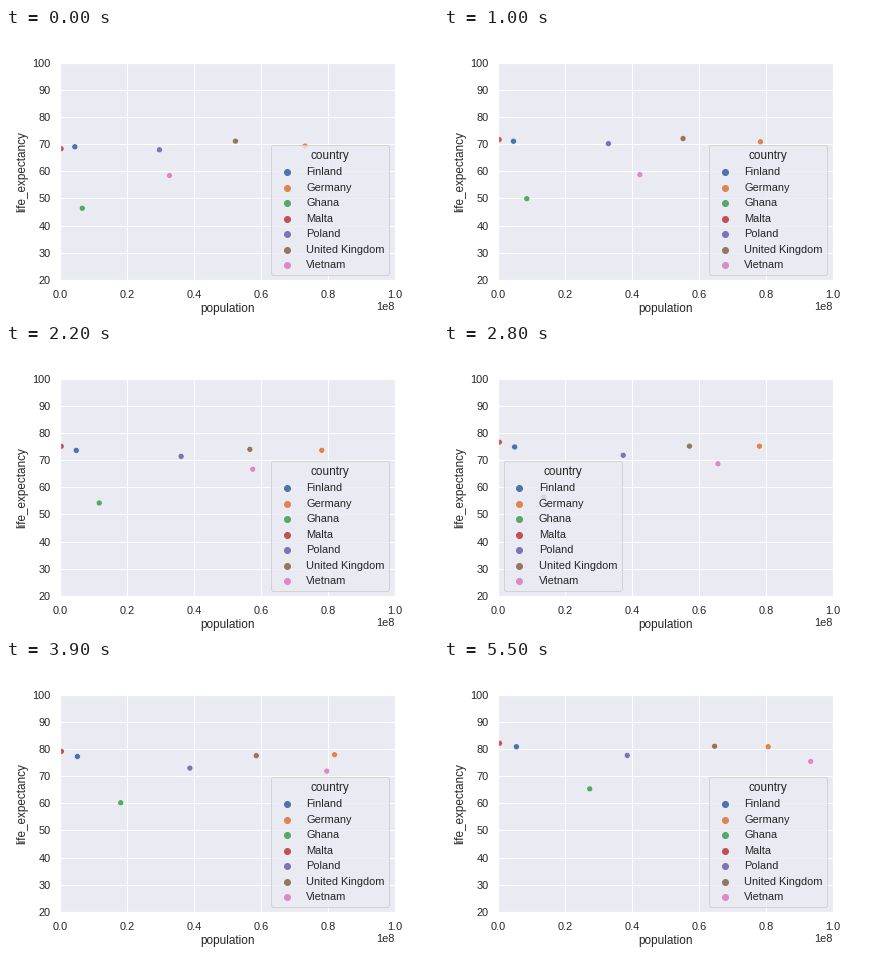
A matplotlib script that plays this animation: 432 px wide and 288 px high, repeating every 5.6 s.

```python
import numpy as np
import matplotlib.pyplot as plt
from matplotlib.animation import FuncAnimation

INK = "#262626"
LABEL, SMALL = 11.7, 11
plt.rcParams.update({
    "font.family": "Liberation Sans", "text.color": INK,
    "figure.facecolor": "white", "savefig.facecolor": "white",
    "figure.subplot.left": 0.125, "figure.subplot.right": 0.9,
    "figure.subplot.bottom": 0.125, "figure.subplot.top": 0.88,
    "axes.facecolor": "#EAEAF2", "axes.edgecolor": "white",
    "axes.linewidth": 1.25, "axes.labelsize": LABEL, "axes.labelcolor": INK,
    "axes.grid": True, "axes.axisbelow": True,
    "grid.color": "white", "grid.linewidth": 1, "grid.linestyle": "-",
    "xtick.labelsize": SMALL, "ytick.labelsize": SMALL,
    "xtick.color": INK, "ytick.color": INK,
    "xtick.major.size": 6, "ytick.major.size": 6,
    "xtick.bottom": False, "ytick.left": False,
    "lines.linewidth": 1.5, "lines.markersize": 6,
    "legend.fontsize": SMALL, "legend.title_fontsize": LABEL,
})

STEP_MS = 100
YEARS = np.arange(1960, 2016)
U = np.linspace(0, 1, len(YEARS))


def curve(*knots):
    """Smooth path through evenly spaced values."""
    n = len(knots)
    return np.polyval(np.polyfit(np.linspace(0, 1, n), knots, n - 1), U)


def growth(start, end):
    """Constant yearly rate from start to end."""
    return start * (end / start) ** U


def dip(year, width, depth):
    return depth * np.exp(-((YEARS - year) / width) ** 2)


# Two plateaus with a rise in the nineties
german_people = np.interp(YEARS, [1960, 1970, 1988, 1999, 2015],
                          [73.2, 78.4, 78.1, 82.0, 80.7])

# Name: colour, population in millions, life expectancy
COUNTRIES = {
    "Finland": ("#4C72B0", curve(4.43, 5.50), curve(69.0, 72.8, 76.7, 80.8)),
    "Germany": ("#DD8452", german_people, curve(69.3, 72.7, 77.3, 80.8)),
    "Ghana": ("#55A868", growth(6.65, 27.4), curve(46.4, 52.9, 59.4, 65.3)),
    "Malta": ("#C44E52", curve(0.31, 0.42), curve(68.3, 74.1, 78.6, 82.1)),
    "Poland": ("#8172B3", curve(29.7, 35.3, 38.6, 38.6),
               curve(67.9, 71.1, 72.6, 77.6)),
    "United Kingdom": ("#937860", curve(52.4, 56.4, 58.2, 64.7),
                       curve(71.1, 73.3, 77.0, 81.0)),
    "Vietnam": ("#DA8BC3", curve(32.7, 52.7, 76.9, 93.4),
                curve(58.5, 65.4, 71.2, 75.4) - dip(1970, 5, 3.6)),
}

# Shape: country, year, (x, y)
TRACKS = np.array([np.column_stack([people * 1e6, life])
                   for _, people, life in COUNTRIES.values()])
COLORS = [color for color, _, _ in COUNTRIES.values()]

fig, ax = plt.subplots(figsize=(6, 4), dpi=72)
ax.set(xlim=(0, 1e8), ylim=(20, 100))
ax.set_xlabel("population", labelpad=3.5)
ax.set_ylabel("life_expectancy", labelpad=3.5)
dots = ax.scatter(*TRACKS[:, 0].T, s=36, c=COLORS,
                  edgecolor="white", linewidth=0.48)
keys = [ax.scatter([], [], color=color, label=name)
        for name, color in zip(COUNTRIES, COLORS)]
legend = ax.legend(handles=keys, title="country", loc="lower right")


def legend_spot(points):
    # The legend steps aside while a dot lies in its right-hand place
    x, y = points.T
    covered = np.any((x > 63.5e6) & (y < 68.8))
    return "lower left" if covered else "lower right"


def draw(i):
    points = TRACKS[:, i]
    dots.set_offsets(points)
    legend.set_loc(legend_spot(points))
    return dots, legend


anim = FuncAnimation(fig, draw, frames=len(YEARS), interval=STEP_MS,
                     init_func=lambda: draw(0), repeat=True, repeat_delay=0)
plt.show()
```
